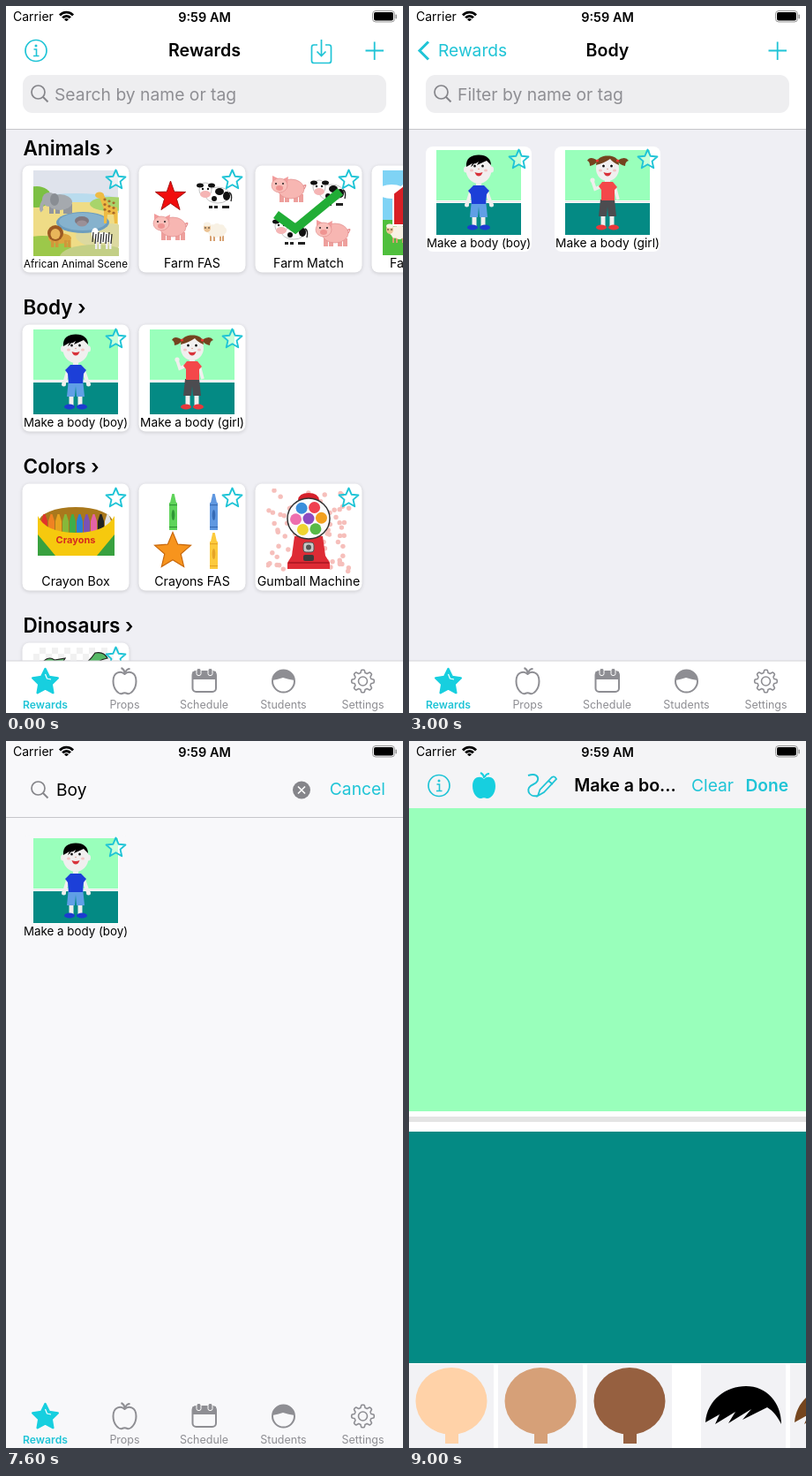
An HTML page with a canvas that plays this animation: 450x800 px, repeating every 9200 ms.

```html
<!DOCTYPE html>
<html lang="en">
<head>
<meta charset="utf-8">
<title>Rewards</title>
<style>
html, body { margin: 0; width: 100%; height: 100%; overflow: hidden; background: #fff; }
canvas { display: block; width: 450px; height: 800px; }
</style>
</head>
<body>
<canvas id="stage"></canvas>
<script>
const W = 450, H = 800, LOOP = 9200, STEP = 200;
const TINT = '#1fc4d6', GRAY = '#8e8e93', PAGE = '#efeff4', PALE = '#f8f8fa', FIELD = '#eeeef0';
const MINT = '#99ffbb', TEAL = '#048a84';
const canvas = document.getElementById('stage');
const ratio = window.devicePixelRatio || 1;
canvas.width = W * ratio;
canvas.height = H * ratio;
const ctx = canvas.getContext('2d');
ctx.scale(ratio, ratio);

// Drawing helpers
const clamp = v => Math.max(0, Math.min(1, v));
const mix = (a, b, p) => a + (b - a) * p;
const ease = p => { p = clamp(p); return p * p * (3 - 2 * p); };

function rect(x, y, w, h, fill) { ctx.fillStyle = fill; ctx.fillRect(x, y, w, h); }
function paint(p, fill, stroke, width = 1) {
  if (fill) { ctx.fillStyle = fill; ctx.fill(p); }
  if (stroke) { ctx.strokeStyle = stroke; ctx.lineWidth = width; ctx.stroke(p); }
}
function round(x, y, w, h, r, fill, stroke, width) {
  const p = new Path2D();
  p.roundRect(x, y, w, h, r);
  paint(p, fill, stroke, width);
}
function oval(x, y, rx, ry, fill, stroke, width) {
  const p = new Path2D();
  p.ellipse(x, y, rx, ry, 0, 0, 7);
  paint(p, fill, stroke, width);
}
const path = (d, fill, stroke, width) => paint(new Path2D(d), fill, stroke, width);
function star(x, y, r, fill, stroke, width, inner = .45) {
  const p = new Path2D();
  for (let i = 0; i < 10; i++) {
    const a = i * Math.PI / 5 - Math.PI / 2, k = i % 2 ? r * inner : r;
    p.lineTo(x + k * Math.cos(a), y + k * Math.sin(a));
  }
  p.closePath();
  paint(p, fill, stroke, width);
}
function text(s, x, y, size, color = '#000', weight = 400, align = 'left') {
  ctx.font = `${weight} ${size}px Inter, sans-serif`;
  ctx.fillStyle = color;
  ctx.textAlign = align;
  ctx.textBaseline = 'alphabetic';
  ctx.fillText(s, x, y + size * .355);
}
function group(x, y, draw, alpha = 1) {
  if (alpha <= 0) return;
  ctx.save();
  ctx.translate(x, y);
  ctx.globalAlpha *= alpha;
  draw();
  ctx.restore();
}
function clip(x, y, w, h, draw) {
  ctx.save();
  ctx.beginPath();
  ctx.rect(x, y, w, h);
  ctx.clip();
  draw();
  ctx.restore();
}

// Animals
function pig(x, y) {
  group(x, y, () => {
    for (const lx of [-9, -3, 7, 13]) rect(lx, 6, 5, 9, '#ee9f9c');
    oval(4, 0, 15, 11, '#f7b6b2', '#d88', .6);
    path('M-17-7L-17-15L-9-11M-5-11L1-14L0-6', '#f29c9c');
    oval(-9, -4, 9, 8, '#f9c0bb', '#d88', .6);
    oval(-9, -1, 4, 3, '#ef9492');
    for (const e of [-13, -5]) oval(e, -6, 1, 1, '#222');
    path('M18-3q5-4 1 3', null, '#e58d8d', 1.3);
  });
}
function cow(x, y) {
  group(x, y, () => {
    for (const lx of [-6, 0, 9, 13]) { rect(lx, 5, 4, 9, '#fff'); rect(lx, 12, 4, 3, '#222'); }
    oval(4, 0, 14, 9, '#fff', '#999', .6);
    oval(6, -4, 5, 4, '#111');
    oval(14, 1, 4, 5, '#111');
    oval(0, 4, 3, 3, '#111');
    path('M17-3q4 2 2 10', null, '#222', 1.4);
    oval(-10, -6, 7, 8, '#fff', '#999', .6);
    oval(-16, -11, 4, 2.5, '#111');
    oval(-3, -11, 4, 2.5, '#111');
    oval(-10, -1, 6, 4, '#f5b5b5');
    for (const e of [-13, -7]) oval(e, -7, 1.2, 1.2, '#111');
  });
}
function sheep(x, y) {
  group(x, y, () => {
    for (const lx of [-5, -1, 6, 9]) rect(lx, 5, 2, 7, '#d7a070');
    for (let i = 0; i < 8; i++) oval(3 + 7 * Math.cos(i * .785), 4 * Math.sin(i * .785), 4, 4, '#f8f1e4');
    oval(3, 0, 8, 5, '#f8f1e4');
    oval(-8, -3, 4, 5, '#ecc394');
    oval(-8, -7, 4, 2.5, '#f8f1e4');
    for (const e of [-10, -6]) oval(e, -3, .8, .8, '#222');
  });
}

// Pictures, each 96 by 96
function savanna() {
  rect(0, 0, 96, 96, '#dfe3ec');
  oval(48, 40, 60, 14, '#b9dcee');
  rect(0, 36, 96, 60, '#efdc86');
  oval(88, 38, 24, 8, '#a8d46b');
  oval(4, 30, 16, 12, '#7cc043');
  oval(82, 74, 34, 14, '#dcd9a0');
  oval(10, 92, 34, 18, '#9cc84a');
  oval(70, 98, 40, 14, '#c3cf86');
  oval(56, 59, 30, 12, '#6d9dbd');
  oval(56, 58, 27, 10, '#86b2cd');
  for (const x of [18, 25, 34, 39]) rect(x, 38, 5, 11, '#92969c');
  oval(30, 36, 14, 9, '#a5a9ae');
  oval(18, 33, 8, 8, '#a5a9ae');
  oval(24, 33, 5, 7, '#898d93');
  path('M12 34q-5 9-2 12', null, '#a5a9ae', 4);
  path('M74 28L79 26L86 40L95 42L95 60L92 60L91 50L84 50L83 60L80 60L80 44Z', '#eebb45');
  oval(75, 28, 5, 3.5, '#eebb45');
  for (let i = 0; i < 9; i++) oval(81 + i % 3 * 5, 33 + i * 1.9, 1.6, 1.4, '#a8682a');
  oval(55, 57, 8, 5, '#80777e');
  oval(55, 60, 6, 3.5, '#9b9097');
  oval(30, 77, 13, 6, '#dca43f');
  for (const x of [20, 25, 35, 39]) rect(x, 79, 3.5, 8, '#d1973a');
  oval(25, 71, 9, 9, '#9c5a22');
  oval(25, 72, 5.5, 6, '#e9b65a');
  for (const x of [70, 74, 82, 86]) rect(x, 78, 2.5, 11, '#eee');
  oval(79, 76, 10, 6, '#fff');
  oval(70, 71, 4, 6, '#fff');
  for (let i = 0; i < 8; i++) path(`M${68 + i * 3} ${70 + i % 2 * 2}l-1 11`, null, '#222', 1.2);
}
function farmPick() {
  star(23.5, 30, 18, '#f10d0d', '#a61010', 1, .4);
  cow(73, 28); pig(22, 64); sheep(73, 68);
}
function farmMatch() {
  pig(24, 21); cow(70, 25); cow(27, 69); pig(74, 71);
  path('M11 50L33 66L84 24', null, '#21ad36', 10);
}
function farmScene() {
  rect(0, 0, 96, 96, '#7fd3f5');
  oval(10, 24, 16, 8, '#fff');
  rect(0, 56, 96, 40, '#4fbf3d');
  path('M12 62V26L40 4L70 26V62Z', '#d91f26', '#fff', 2);
  sheep(16, 70);
}
function room() {
  rect(0, 0, 97, 97, '#fff');
  rect(0, 0, 96, 57, MINT);
  rect(0, 58, 96, 1, '#e2e2e2');
  rect(0, 60, 96, 36, TEAL);
}
function face() {
  for (const s of [-1, 1]) {
    oval(48 + s * 4.5, 17.5, 2, 2.3, '#fff');
    oval(48 + s * 4.5, 18, 1.4, 1.6, '#111');
    oval(48 + s * 8, 23, 2, 1.6, '#f3c4c4');
  }
  oval(48, 21.5, 1, .8, '#dba8a0');
  path('M43.500 25Q48 27 52.500 25Q51 29.500 48 29.500Q45 29.500 43.500 25Z', '#d8323a');
}
function legs(shorts, shoes, knee) {
  for (const s of [-1, 1]) {
    rect(48 + s * 5 - 2.5, 70, 5, 17, '#f1efee');
    oval(48 + s * 7, 87.5, 6, 3, shoes);
  }
  path(`M40 56H56L58 ${knee}H49L48 64L47 ${knee}H38Z`, shorts);
}
function boy() {
  room();
  legs('#609fe6', '#1c3bd0', 76);
  path('M40 44L35 61M56 44L62 61', null, '#f1efee', 4);
  oval(34.5, 62, 2.5, 2.5, '#f1efee');
  oval(62.5, 62, 2.5, 2.5, '#f1efee');
  rect(45, 34, 6, 8, '#eee');
  path('M42 40H54L60 46L57 50L56 61H40L39 50L36 46Z', '#1c3fd8');
  oval(33.5, 22, 2.5, 3.5, '#eee');
  oval(62.5, 22, 2.5, 3.5, '#eee');
  oval(48, 22, 14.5, 16, '#f1efef');
  path('M34 19C33 9 40 5.500 48 5.500C57 5.500 62 10 62 17L57 12L46 17L48 13L39 19L41 15Z', '#000');
  face();
}
function girl() {
  room();
  legs('#4c4c50', '#e8383c', 75);
  path('M41 41L34 44L31 35M56 41L60 56', null, '#f1efee', 3.6);
  oval(31, 34, 2.6, 2.6, '#f1efee');
  rect(45, 31, 6, 7, '#eee');
  path('M42 36H54L59 42L56 45V57H41V45L38 41Z', '#f4484a');
  path('M37 12Q28 6 25 12Q28 13 28 18Q34 17 37 12M59 12Q68 6 72 12Q68 13 68 18Q62 17 59 12', '#74431f');
  oval(48, 21, 13, 14, '#f1efef');
  path('M35 17C35 9 42 6.500 48 6.500C55 6.500 61 9 61 17Q54 14 51 10Q44 15 35 17Z', '#74431f');
  oval(36.5, 12, 1.6, 1.6, '#e33');
  oval(59.5, 12, 1.6, 1.6, '#e33');
  face();
}
const CRAYONS = ['#e0342c', '#f08222', '#e8a31f', '#86b83a', '#3fae49', '#2a7fd4', '#7a52b5', '#e463a5', '#222', '#e4e4e4'];
function crayonBox() {
  oval(48, 38, 42, 17, '#a9781c');
  CRAYONS.forEach((c, i) => {
    const x = 9 + i * 8;
    path(`M${x} 56V37L${x + 2.5} 29H${x + 4.5}L${x + 7} 37V56Z`, c);
  });
  path('M5 31Q14 50 48 50Q82 50 92 31V76H5Z', '#f6c90e');
  path('M5 52L25 76H5ZM92 52L72 76H92Z', '#38a13f');
  text('Crayons', 48, 58, 11, '#d62b1f', 700, 'center');
}
function crayon(x, y, color, dark) {
  path(`M${x - 3.5} ${y - 10}L${x - 1.2} ${y - 20}H${x + 1.2}L${x + 3.5} ${y - 10}Z`, color);
  rect(x - 4.5, y - 10, 9, 31, color);
  rect(x - 4.5, y - 8, 9, 1.2, dark);
  rect(x - 4.5, y + 17, 9, 1.2, dark);
  oval(x, y + 4, 1.8, 6, dark);
}
function crayonPick() {
  crayon(26.5, 26, '#5fd35a', '#2f9636');
  crayon(72.5, 26, '#5f97e0', '#376bb5');
  crayon(72.5, 70, '#fcca3c', '#e5a426');
  star(26, 71, 21.5, '#f7941d', '#c9690c', 1.2);
}
function gumball() {
  let seed = 7;
  const rand = () => (seed = seed * 16807 % 2147483647) / 2147483647;
  for (let i = 0; i < 90; i++) oval(2 + rand() * 92, 2 + rand() * 92, 2.7, 2.7, '#f6bfbb');
  path('M36 13Q37 5 48 5Q59 5 60 13Z', '#d6202b');
  path('M32 54H64L67 76L72 84V91H24V84L29 76Z', '#de2b35');
  rect(25, 83, 46, 2, '#b51a25');
  oval(48, 34, 24, 23, '#fbfbfb', '#333', 1.5);
  oval(48, 34, 6.5, 6.5, '#8d4bc1');
  ['#ef4050', '#f2a01f', '#58b947', '#efd530', '#ed6fae', '#3a8edb'].forEach((c, i) => {
    const a = i * Math.PI / 3 - 1.1;
    oval(48 + 14.5 * Math.cos(a), 34 + 14 * Math.sin(a), 6.5, 6.5, c);
  });
  round(42, 61, 12, 11, 3, '#c9c9c9', '#555', 1);
  oval(48, 66.5, 3, 3, '#555');
  round(42, 75, 12, 7, 2, '#3b3b3b');
}
function dinosaur() {
  for (let y = 0; y < 3; y++) for (let x = 0; x < 14; x++) if ((x + y) % 2) rect(x * 7, y * 7, 7, 7, '#f1f1f1');
  path('M8 20Q16 8 24 14L36 12L30 22ZM50 24Q62 18 70 6Q80 4 84 12Q72 14 66 24Z', '#55b865', '#222', 1.2);
}

// Tiles and lists
function tile(name, art, x, y, { compact = false, blank = false, card = '#fff' } = {}) {
  group(x, y, () => {
    if (compact) round(-12, -4, 120, 119, 8, card);
    else {
      ctx.save();
      ctx.shadowColor = 'rgba(0,0,0,.16)';
      ctx.shadowBlur = 4 * ratio;
      ctx.shadowOffsetY = ratio;
      round(-12.5, -5.5, 121, 121, 8, '#fff');
      ctx.restore();
    }
    if (!blank) clip(0, 0, 97, 97, art);
    ctx.lineJoin = 'round';
    star(93.5, 11, 11.5, 'rgba(255,255,255,.45)', TINT, 1.9, .46);
    ctx.font = '400 14.2px Inter, sans-serif';
    const size = 14.2 * Math.min(1, 118 / ctx.measureText(name).width);
    text(name, 48, 105.4, size, '#000', 400, 'center');
  });
}
const BOY = ['Make a body (boy)', boy], GIRL = ['Make a body (girl)', girl];
const SECTIONS = [
  ['Animals', ['African Animal Scene', savanna], ['Farm FAS', farmPick], ['Farm Match', farmMatch], ['Farm Scene', farmScene]],
  ['Body', BOY, GIRL],
  ['Colors', ['Crayon Box', crayonBox], ['Crayons FAS', crayonPick], ['Gumball Machine', gumball]],
  ['Dinosaurs', ['Dinosaur Scene', dinosaur]]
];
function rewardsList() {
  rect(0, 139, W, 602, PAGE);
  SECTIONS.forEach(([title, ...items], row) => {
    text(title + ' ›', 19.5, 161 + row * 180, 22.5, '#000', 600);
    items.forEach(([name, art], col) => tile(name, art, 31 + col * 132, 186 + row * 180));
  });
}
function bodyList(top, items, pale, blank) {
  rect(0, top, W, 741 - top, pale ? PALE : PAGE);
  items.forEach(([name, art], i) =>
    tile(name, art, 31 + i * 146, top + 24, { compact: true, blank, card: pale ? PALE : '#fff' }));
}

// Bars and icons
function statusBar() {
  text('Carrier', 8, 12.5, 14);
  for (const r of [2, 6, 10.3]) {
    ctx.beginPath();
    ctx.arc(68.5, 17.5, r, -Math.PI * .76, -Math.PI * .24);
    ctx.strokeStyle = '#000';
    ctx.lineWidth = 2.8;
    ctx.stroke();
  }
  text('9:59 AM', 225, 12.5, 14.5, '#000', 600, 'center');
  round(415.5, 5.5, 25, 12.5, 3.5, null, '#999', 1);
  round(417, 7, 22, 9.5, 2, '#000');
  round(441.5, 9.5, 1.5, 5, 1, '#999');
}
function infoIcon() {
  oval(34, 50.5, 12, 12, null, TINT, 1.7);
  oval(34, 45, 1.5, 1.5, TINT);
  path('M31.500 49H34.500V56M31 56.500H37.500', null, TINT, 1.6);
}
const plusIcon = () => path('M407.500 50.500H428M417.700 40.500V61', null, TINT, 1.8);
const saveIcon = () => path('M353 44H349Q346.500 44 346.500 46.500V62Q346.500 64.500 349 64.500H366Q368.500 64.500 368.500 62V46.500Q368.500 44 366 44H362M357.500 38V56M352.500 51.500L357.500 56.500L362.500 51.500', null, TINT, 1.7);
function apple(x, y, fill, stroke) {
  group(x, y, () => {
    path('M0-8C-4-12-13-11-13 0C-13 9-7 15-3 14C-1 13 1 13 3 14C7 15 13 9 13 0C13-11 4-12 0-8Z', fill, stroke, 2);
    path('M0-9Q0-13-4-15M1-10Q2-14 6-14', null, fill || stroke, 2);
  });
}
function gear(x, y) {
  const p = new Path2D();
  for (let i = 0; i < 96; i++) {
    const a = i / 96 * Math.PI * 2, r = 11.2 + 1.6 * Math.tanh(2.5 * Math.cos(8 * a));
    p.lineTo(x + r * Math.cos(a), y + r * Math.sin(a));
  }
  p.closePath();
  paint(p, null, GRAY, 1.6);
  oval(x, y, 5, 5, null, GRAY, 1.6);
}
function tabBar(pale) {
  rect(0, 741, W, 59, pale ? PALE : '#fff');
  if (!pale) rect(0, 740.5, W, 1, '#d4d4d8');
  ctx.lineJoin = 'round';
  star(44.5, 765, 15, '#17cfdf', '#17cfdf', 2.5, .5);
  path('M44.5 756L46.5 761L51 762', null, '#fff', 1.2);
  apple(134.5, 764, null, GRAY);
  round(211.5, 753, 26.5, 23, 4, null, GRAY, 2);
  rect(211.5, 753, 26.5, 9, GRAY);
  for (const x of [216, 229]) round(x, 749.5, 5, 8, 2, GRAY, '#fff', 1);
  oval(314.5, 764, 12.5, 12.5, null, GRAY, 2);
  path('M302 763C303 747 326 747 327 763Q320 762 314 760Q308 762 302 763Z', GRAY);
  gear(404.5, 764);
  ['Rewards', 'Props', 'Schedule', 'Students', 'Settings'].forEach((s, i) =>
    text(s, 44.5 + i * 90, 791, i ? 12.5 : 12.2, i ? GRAY : TINT, i ? 400 : 600, 'center'));
  ctx.lineJoin = 'miter';
}
function magnifier(y) {
  oval(36.5, y - 2, 7.5, 7.5, null, '#85858a', 1.7);
  path(`M42 ${y + 3.5}L47.500 ${y + 9}`, null, '#85858a', 2);
}

// Screens
function header(push, focus, state) {
  const bottom = mix(139, 86, focus), y = mix(99.5, 55.5, focus), nav = 1 - focus;
  const { typed, caret, pale } = state;
  rect(0, 0, W, bottom, pale ? PALE : '#fff');
  rect(0, bottom, W, 1, '#c6c6ca');
  group(0, -30 * focus, () => {
    group(0, 0, () => { infoIcon(); saveIcon(); }, 1 - push);
    plusIcon();
    group(0, 0, () => text('Rewards', mix(225, 72, push), 50.5, 19.6, '#000', 600, 'center'), 1 - push);
    group(0, 0, () => {
      path('M22 40.5L12 50.5L22 60.5', null, TINT, 3);
      text('Rewards', mix(184, 33, push), 50.5, 19.2, TINT);
      text('Body', mix(400, 225, push), 50.5, 19.6, '#000', 600, 'center');
    }, push);
  }, nav * nav);
  if (!pale) round(19, y - 21.5, mix(412, 335, focus), 43, 11, FIELD);
  magnifier(y);
  if (typed) {
    text(typed, 57, y, 19.2);
    oval(335, y, 10, 10, '#85858a');
    path(`M331 ${y - 4}l8 8m0-8l-8 8`, null, '#fff', 1.6);
  } else {
    group(0, 0, () => text('Search by name or tag', 55, y + .5, 19.3, GRAY), 1 - push);
    group(0, 0, () => text('Filter by name or tag', 55, y + .5, 19.3, GRAY), push);
  }
  if (caret) {
    ctx.font = '400 19.2px Inter, sans-serif';
    round(typed ? 57.5 + ctx.measureText(typed).width : 55, y - 13, 2.4, 26, 1, TINT);
  }
  group(mix(80, 0, focus), 0, () => text('Cancel', 430, y - 1, 19.3, TINT, 400, 'right'), focus);
}

const SKINS = ['#ffd2a8', '#d6a078', '#966040'];
function hair(x, color) {
  group(x, 730, () => path('M0 41C2 15 24 0 46 0C69 0 86 18 86 43C82 35 77 28 70 24L42 38L52 26L26 42L34 29L11 43L16 32L0 41Z', color));
}
function editor() {
  rect(0, 0, W, H, '#fff');
  rect(0, 0, W, 76, '#f4f4f6');
  infoIcon();
  apple(85, 51, '#17cfdf');
  path('M135 39C147 35 150 45 141 49C131 53 135 64 146 62', null, TINT, 2);
  path('M146 62L148.5 55L162 41Q165 39 167 43L153 58ZM158 45L163 49', null, TINT, 1.8);
  text('Make a bo…', 245, 50.5, 19.6, '#000', 600, 'center');
  text('Clear', 320, 50.5, 19.2, TINT);
  text('Done', 430, 50.5, 19.2, TINT, 600, 'right');
  rect(0, 76, W, 343, MINT);
  rect(0, 425, W, 6, '#e4e4e4');
  rect(0, 442, W, 262, TEAL);
  for (const x of [0, 101, 202, 331, 432]) rect(x, 705, 96, 95, '#f2f2f5');
  SKINS.forEach((c, i) => {
    oval(48 + i * 101, 747, 40.5, 38, c);
    rect(41 + i * 101, 782, 15, 13, c);
  });
  hair(336, '#000');
  hair(437, '#75461f');
}

// Timeline in ms
const PUSH = 1100, FOCUS = 3500, TYPE = [5200, 5600, 6000], RESIGN = 7400, OPEN = 7800, DIMMEST = 8200;

function render(t) {
  const push = t < PUSH ? 0 : t >= 1800 ? 1 : 1 - Math.exp(-.0108 * (t - PUSH));
  const focus = ease((t - FOCUS) / 500);
  const count = TYPE.filter(at => t >= at).length;
  const editing = t >= 4000 && t < RESIGN;
  const state = {
    typed: 'Boy'.slice(0, count),
    pale: t >= 7600,
    caret: editing && ((t - 4000) % 1000 < 500 || t >= TYPE[0] && t < 6400)
  };
  const opened = t < OPEN ? 0 : t < 8000 ? .15 : t < 8200 ? .6 : t < 8400 ? .97 : 1;
  const dim = .14 * clamp(1 - Math.abs(t - DIMMEST) / 400);

  if (opened < 1) {
    if (push < 1) group(-135 * push, 0, rewardsList);
    if (push > 0) {
      const items = count === 3 ? [BOY] : [BOY, GIRL];
      group(W * (1 - push), 0, () => bodyList(mix(139, 86, focus), items, state.pale, TYPE.includes(t)));
    }
    header(push, focus, state);
    tabBar(state.pale);
  }
  group(0, 0, editor, opened);
  rect(0, 0, W, H, `rgba(0,0,0,${dim})`);
  statusBar();
}

function tick(now) {
  render(Math.floor(now % LOOP / STEP) * STEP);
  requestAnimationFrame(tick);
}
render(0);
requestAnimationFrame(tick);
</script>
</body>
</html>
```
